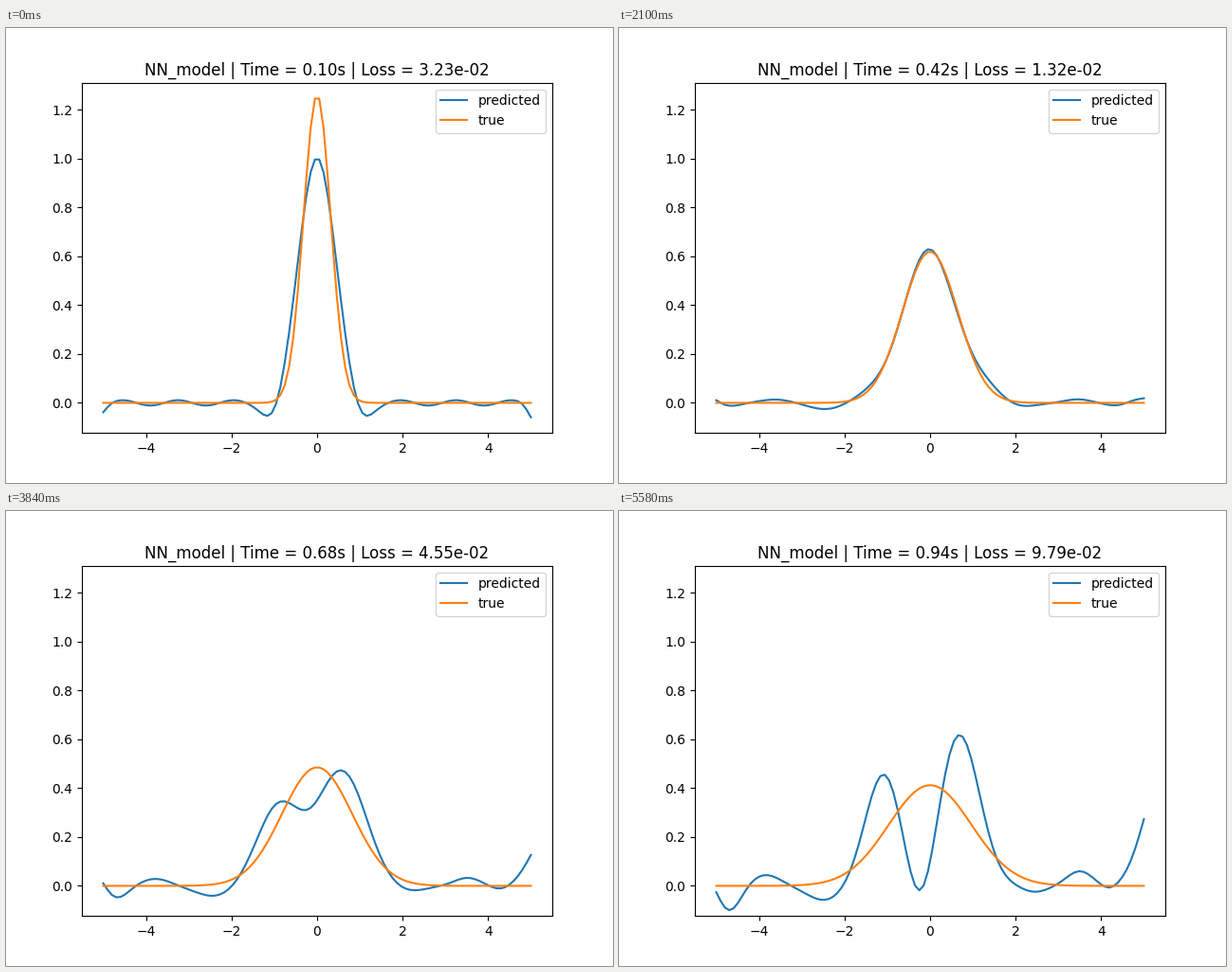
Recreate the animation shown at these times as a matplotlib script. Size 640x480 px, loop 5.61 s.

```python
import numpy as np
import matplotlib.pyplot as plt
from matplotlib.animation import FuncAnimation

FRAMES = 187
STEP_MS = 30
MID = 0.49  # when the middle shape is reached, as a share of the loop

x = np.linspace(-5, 5, 100)


def bumps(*parts):
    """Sum of Gaussian bumps given as (centre, width, height)."""
    return sum(h * np.exp(-((x - c) / w)**2 / 2) for c, w, h in parts)


# Network output: one peak with ripples, a broad hump, then a split peak
start = bumps((0, .425, 1.014), (-1, .25, -.085), (1, .25, -.085),
              (-5.1, .15, -.04), (5.1, .15, -.066))
start -= 0.011 * np.cos(2 * np.pi * x / 1.3)

middle = bumps((.05, .8, .524), (-1.1, .45, .02), (-2.35, .45, -.036),
               (2, .4, -.033), (-5.1, .15, .03), (-4.65, .25, -.024),
               (-3.7, .35, .019), (3.5, .3, .02), (4.35, .25, -.015),
               (5.4, .42, .085))

end = bumps((-1.08, .43, .46), (.68, .475, .621), (-.22, .315, -.182),
            (-2.45, .42, -.06), (2.45, .3, -.025), (-5.15, .2, .04),
            (-4.7, .27, -.105), (-3.85, .35, .045), (3.5, .3, .06),
            (4.2, .2, -.018), (5.4, .42, .43))


def predicted(u):
    """Quadratic path in time through the three shapes."""
    return (start * (u - MID) * (u - 1) / MID
            + middle * u * (1 - u) / (MID * (1 - MID))
            + end * u * (u - MID) / (1 - MID))


def true(t):
    """Spreading Gaussian with variance t."""
    return np.exp(-x**2 / (2 * t)) / np.sqrt(2 * np.pi * t)


def loss(t):
    """Log-linear path through a few measured losses."""
    at = [.1, .1945, .316, .5095, .676, .784, .937]
    values = [3.23e-2, 7.78e-3, 9.44e-3, 1.83e-2, 4.55e-2, 6.61e-2, 9.79e-2]
    return np.exp(np.interp(t, at, np.log(values)))


fig, ax = plt.subplots(figsize=(6.4, 4.8), dpi=100)
pred_line, = ax.plot(x, predicted(0), label="predicted")
true_line, = ax.plot(x, true(0.1), label="true")
ax.set_xlim(-5.5, 5.5)
ax.set_ylim(-0.1232, 1.3108)
ax.legend(loc="upper right")
title = ax.set_title("")


def update(i):
    t = 0.1 + 0.0045 * i
    pred_line.set_ydata(predicted(i / (FRAMES - 1)))
    true_line.set_ydata(true(t))
    title.set_text(f"NN_model | Time = {t:.2f}s | Loss = {loss(t):.2e}")
    return pred_line, true_line, title


anim = FuncAnimation(fig, update, frames=FRAMES, interval=STEP_MS,
                     repeat=True, repeat_delay=0)
plt.show()
```
